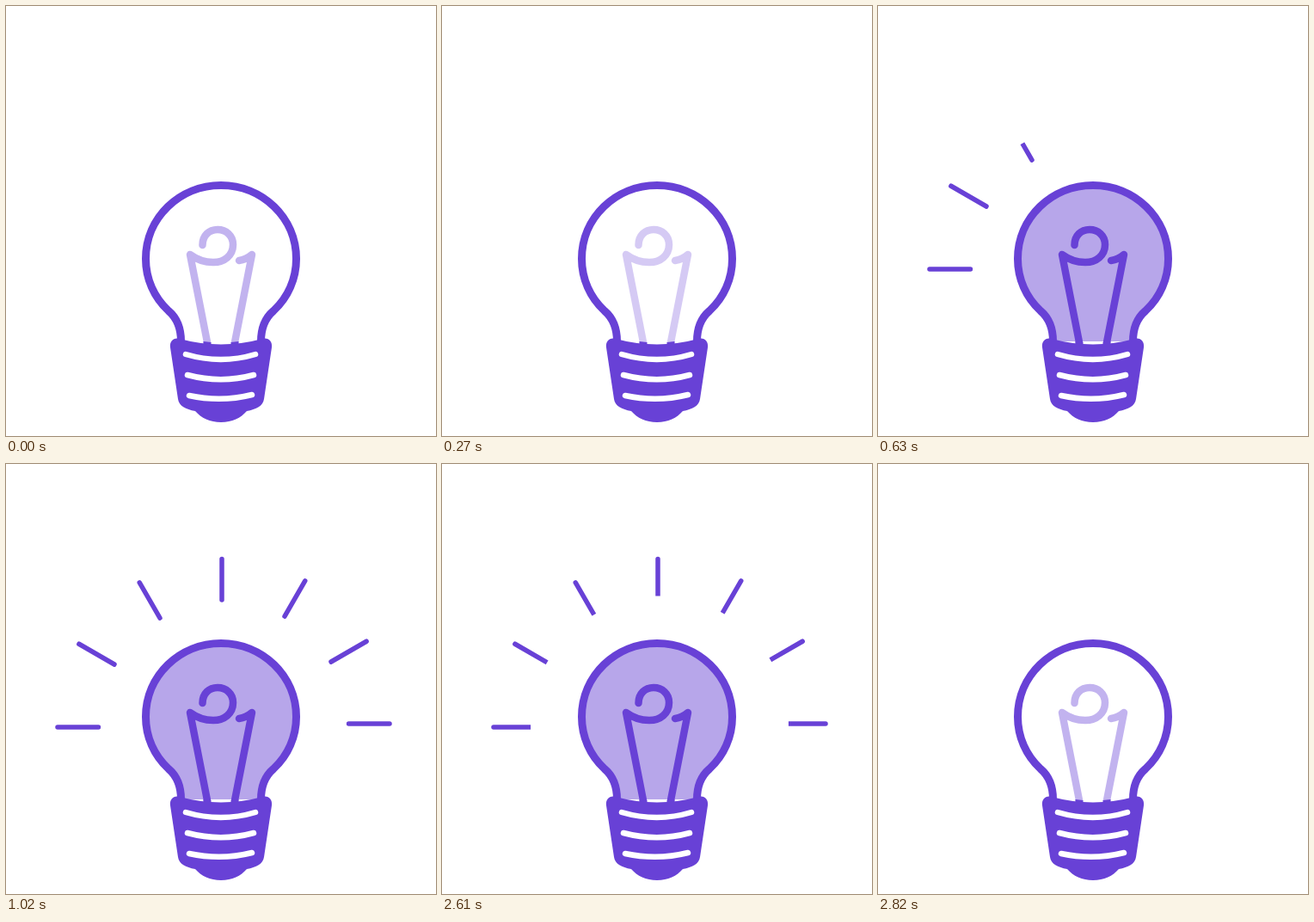
These frames come from a looping animation (500x500 px, 4.17 s). An HTML page with a canvas:

```html
<!DOCTYPE html>
<html lang="en">
<head>
<meta charset="utf-8">
<title>Light bulb</title>
<style>
  html, body { margin: 0; width: 100%; height: 100%; overflow: hidden; background: #fff; }
  canvas { display: block; width: 500px; height: 500px; }
</style>
</head>
<body>
<canvas id="stage" width="500" height="500"></canvas>
<script>
const LOOP = 4170, STEP = 30;
const PURPLE = '#6841d6', GLOW = '#b7a6ea';
const ctx = document.getElementById('stage').getContext('2d');
ctx.lineCap = ctx.lineJoin = 'round';

const glass = new Path2D(`M203.5 390 C203.5 375 199 363 189 354.5 C172 339 162.5 317 162.5 294
  C162.5 246 202 208.5 250 208.5 C298 208.5 337.5 246 337.5 294
  C337.5 317 328 339 311 354.5 C301 363 296.5 375 296.5 390`);
const base = new Path2D(`M202 387 Q250 400 298 387 C305 385 310 390 309 397 L300 457
  C299 465 291 469 280 471 C273 479 263 484 250 484 C237 484 227 479 220 471
  C209 469 201 465 200 457 L191 397 C190 390 195 385 202 387Z`);
const threads = new Path2D('M209 405 Q250 417 290 405 M211 429 Q250 439.5 288 429 M213 453 Q250 461 286 452');
const filament = new Path2D(`M234 391 L214 289 C222 295 232 298 241 298 C254 298 264 290 264 277.5
  C264 267 256 260 246 260 C236 260 228.5 267 228.5 278 M271 296 Q279 295 286 289 L266 391`);
const sockets = new Path2D('M229.5 390 L238.5 391 V396 H229.5Z M270.5 390 L261.5 391 V396 H270.5Z');

// Inner end and direction (degrees) of each ray, left to right
const rays = [
  [107.5, 306, 180], [126, 233, 210], [179, 179, 240], [251, 158, 270],
  [324, 177, 300], [378, 230, 330], [398.5, 302, 360]
];
const RAY_LENGTH = 47.5, CAP = 3, RAY_SPAN = RAY_LENGTH + 2 * CAP + 0.5;

const ramp = (t, from, to) => Math.min(1, Math.max(0, (t - from) / (to - from)));
const smooth = p => p * p * (3 - 2 * p);

function stroke(path, width, color = PURPLE) {
  ctx.lineWidth = width;
  ctx.strokeStyle = color;
  ctx.stroke(path);
}

function drawRay([x, y, angle], start, end) {
  if (end <= start) return;
  ctx.save();
  ctx.translate(x, y);
  ctx.rotate(angle * Math.PI / 180);
  ctx.beginPath();
  ctx.rect(-CAP + start * RAY_SPAN, -5, (end - start) * RAY_SPAN, 10);
  ctx.clip();
  stroke(new Path2D(`M0 0H${RAY_LENGTH}`), 5.5);
  ctx.restore();
}

function draw(t) {
  const switchOn = ramp(t, 270, 360), switchOff = ramp(t, 2610, 2700);
  const heat = 0.4 - 0.12 * ramp(t, 150, 270) + 0.72 * switchOn - 0.6 * switchOff;

  ctx.fillStyle = '#fff';
  ctx.fillRect(0, 0, 500, 500);

  ctx.globalAlpha = switchOn - switchOff;
  ctx.fillStyle = GLOW;
  ctx.fill(glass);
  ctx.globalAlpha = heat;
  stroke(filament, 8.5);
  ctx.globalAlpha = 1;

  stroke(glass, 9);
  ctx.fillStyle = PURPLE;
  ctx.fill(sockets);
  ctx.fill(base);
  stroke(threads, 6.5, '#fff');

  const erased = smooth(ramp(t, 2552, 2801));
  rays.forEach((ray, i) => {
    const start = 418 + 86 * i;
    drawRay(ray, erased, ramp(t, start, start + 86));
  });
}

function tick() {
  const t = performance.now() % LOOP;
  draw(Math.floor(t / STEP) * STEP);
  requestAnimationFrame(tick);
}
tick();
</script>
</body>
</html>
```
